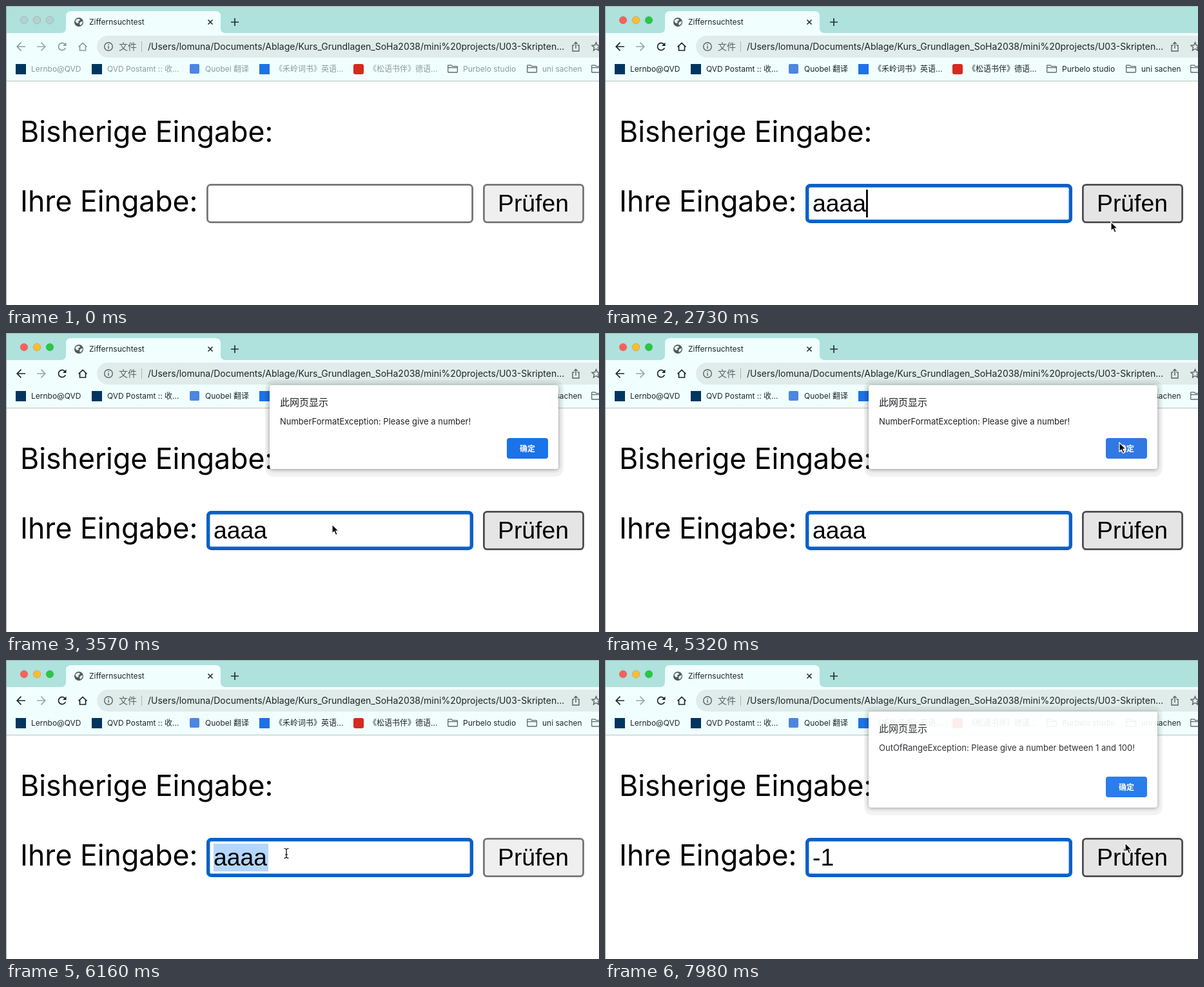
Write an HTML page that moves like this. It is 920 by 464 pixels and loops after 8 s.

```html
<!DOCTYPE html>
<html lang="de">
<head>
<meta charset="utf-8">
<title>Ziffernsuchtest</title>
<style>
  html, body { margin: 0; width: 100%; height: 100%; overflow: hidden; background: #fff; }
  svg { display: block; font: 12px Inter, "Noto Sans CJK SC", sans-serif; --ink: #8f9c9c; }
  text { white-space: pre; }
  .line { fill: none; stroke-width: 1.7; }
  .ink { fill: var(--ink); }
  .inkLine { stroke: var(--ink); }
  .label { font-size: 44.6px; }
  .field { font: 37.33px "Liberation Sans", Arial, sans-serif; }
  .panel { filter: drop-shadow(0 1px 3px #0006); }
</style>
</head>
<body>
<svg width="920" height="464" viewBox="0 0 920 464">
  <defs>
    <path id="folder" class="line" stroke="#5d6969" style="stroke-width:1.3"
      d="M1.5 .8H6L7.6 2.6H14.5Q15.4 2.6 15.4 3.5V11Q15.4 12 14.5 12H1.5Q.7 12 .7 11V1.6Q.7 .8 1.5 .8ZM.7 4.6H15.4"/>
  </defs>

  <!-- Tab strip -->
  <rect width="920" height="42" fill="#afe1dd"/>
  <path d="M0 .5H920" stroke="#93b9b6"/>
  <g id="lights"><circle cx="28" cy="22" r="5.8"/><circle cx="48" cy="22" r="5.8"/><circle cx="68" cy="22" r="5.8"/></g>
  <path fill="#f0fffe" d="M0 42H85Q93 42 93 34V16Q93 8 101 8H325Q333 8 333 16V34Q333 42 341 42H920V116H0Z"/>
  <circle cx="113" cy="25" r="7" fill="#505959"/>
  <path fill="#e4f2f1" d="M108 22Q111 19 114 20L115 22 112 24 113 26 110 27 107.500 24ZM115 25L119 23.500Q119 28 115.500 30L114 28Z"/>
  <text x="129" y="29" fill="#1d2626">Ziffernsuchtest</text>
  <path class="line" stroke="#263030" d="M313.500 21.500L320.500 28.500M320.500 21.500L313.500 28.500M349 25H361M355 19V31"/>

  <!-- Toolbar -->
  <path class="line inkLine" d="M30 63H17.500M23.500 56.700L17.200 63 23.500 69.300"/>
  <path class="line" stroke="#9ba8a8" d="M48 63H60.500M54.500 56.700L60.800 63 54.500 69.300"/>
  <path class="line inkLine" d="M91.500 59.500A5.600 5.600 0 1 0 92.300 65"/>
  <path class="ink" d="M93.500 56.500V62H88Z"/>
  <path class="line inkLine" d="M112.500 63.500L119 57.300 125.500 63.500M114.500 62V69H123.500V62"/>
  <rect x="141" y="46" width="820" height="34" rx="17" fill="#dfecea"/>
  <g class="line" stroke="#596464" style="stroke-width:1.4">
    <circle cx="159" cy="63" r="6.300"/>
    <path d="M159 62V66.500M159 59.300V60.700"/>
    <path d="M881.500 61H879V70H889V61H886.500M884 66V56.500M881.200 59L884 56.300 886.800 59"/>
    <path d="M915.500 56.500L917.300 60.800 922 61.200 918.500 64.300 919.500 69 915.500 66.500 911.500 69 912.500 64.300 909 61.200 913.700 60.800Z"/>
  </g>
  <path d="M210.500 55V71" stroke="#a9b6b5"/>
  <g font-size="14">
    <text x="175" y="68" fill="#596464">文件</text>
    <text x="220" y="68" fill="#1d2626">/Users/lomuna/Documents/Ablage/Kurs_Grundlagen_SoHa2038/mini%20projects/U03-Skripten...</text>
  </g>

  <!-- Bookmarks -->
  <g fill="#003560"><rect x="15" y="90" width="16" height="16"/><rect x="133" y="90" width="16" height="16"/></g>
  <rect x="285" y="90" width="15" height="15" rx="2" fill="#4d86e0"/>
  <rect x="393" y="90" width="16" height="16" fill="#1d72e6"/>
  <rect x="539" y="90" width="16" height="16" rx="3" fill="#d62a1e"/>
  <use href="#folder" x="685" y="91"/><use href="#folder" x="808" y="91"/><use href="#folder" x="908" y="91"/>
  <g class="ink">
    <text x="39" y="102">Lernbo@QVD</text>
    <text x="157" y="102">QVD Postamt :: 收...</text>
    <text x="309" y="102">Quobel 翻译</text>
    <text x="417" y="102">《禾岭词书》英语...</text>
    <text x="563" y="102">《松语书伴》德语...</text>
    <text x="709" y="102">Purbelo studio</text>
    <text x="832" y="102">uni sachen</text>
  </g>
  <path d="M0 116.500H920" stroke="#b9c0c0"/>
  <path d="M.5 0V464" stroke="#9ba3a3"/>

  <!-- Page -->
  <text class="label" x="22" y="210.500">Bisherige Eingabe:</text>
  <text class="label" x="22" y="318.500">Ihre Eingabe:</text>
  <rect id="box" fill="#fff"/>
  <rect id="selection" x="322" y="285" width="85" height="43" fill="#b3d7fe"/>
  <text id="value" class="field" x="322" y="318.500"></text>
  <rect id="caret" y="285" width="2.800" height="43"/>
  <rect id="check" x="741.400" y="277.400" width="154.200" height="58.200" rx="5" stroke-width="2.800"/>
  <text class="field" x="763" y="318.500">Prüfen</text>

  <!-- Alert -->
  <g id="alert">
    <rect id="halo" x="402" y="73" width="463" rx="13" fill="#000" opacity=".05"/>
    <rect id="panel" class="panel" x="409" y="81" width="448" rx="4" fill="#fff"/>
    <text x="425" y="113" font-size="15" fill="#202124">此网页显示</text>
    <text id="message" x="425" y="142" font-size="13" fill="#202124"></text>
    <g id="ok">
      <rect id="okFace" x="777" y="163" width="64" height="32" rx="4"/>
      <text x="809" y="183.500" text-anchor="middle" font-weight="700" fill="#fff">确定</text>
    </g>
  </g>

  <!-- Pointer -->
  <g id="pointer">
    <path id="arrow" stroke="#fff" stroke-width="1.200" d="M0 0V14L3.200 11.200 5.600 16.500 8.200 15.400 5.800 10.200H10Z"/>
    <path id="beam" class="line" stroke="#000" style="stroke-width:1.2" d="M-3.500 -7.500Q0 -7.500 0 -5V5Q0 7.500 -3.500 7.500M3.500 -7.500Q0 -7.500 0 -5M0 5Q0 7.500 3.500 7.500M-2 2H2"/>
  </g>
</svg>
<script>
const LOOP = 8000, TICK = 70, BLINK = 560;
const svg = document.querySelector("svg");
const el = Object.fromEntries([...svg.querySelectorAll("[id]")].map(e => [e.id, e]));

// time, x, y
const path = [
  [0, 526, 475], [630, 515, 308], [2390, 515, 308], [2730, 785, 335], [2960, 785, 335],
  [3570, 506, 297], [4210, 506, 297], [4550, 791, 150], [5050, 791, 150], [5250, 798, 170],
  [5420, 798, 170], [5880, 435, 300], [7150, 435, 300], [7430, 600, 355], [7700, 807, 284]
];
// time, text in the field; each entry also restarts the caret blink
const edits = [
  [0, ""], [1330, ""], [1960, "a"], [2100, "aa"], [2310, "aaa"], [2450, "aaaa"],
  [6020, "aaaa"], [6860, "-"], [7000, "-1"]
];
const advance = { a: 20.76, "-": 12.43, 1: 20.76 };

const clamp = v => Math.max(0, Math.min(1, v));
const between = (t, a, b) => t >= a && t < b;
const inside = ([x, y], left, top, right, bottom) => between(x, left, right) && between(y, top, bottom);
const show = (e, on) => e.setAttribute("visibility", on ? "visible" : "hidden");
const set = (e, attrs) => { for (const k in attrs) e.setAttribute(k, attrs[k]); };

function pointerAt(t) {
  const next = path.findIndex(p => p[0] > t);
  if (next < 0) return path.at(-1).slice(1);
  const [t0, x0, y0] = path[next - 1], [t1, x1, y1] = path[next];
  const u = (t - t0) / (t1 - t0), k = u * u * (3 - 2 * u);
  return [x0 + (x1 - x0) * k, y0 + (y1 - y0) * k];
}

function drawWindow(t) {
  const colours = t < 630 ? ["#b5d0cd"] : ["#fe5f57", "#febc2e", "#28c840"];
  [...el.lights.children].forEach((c, i) => set(c, {
    fill: colours[i % colours.length], stroke: t < 630 ? "#9fbdb9" : "#0002"
  }));
  const active = t < 840 ? 0 : t < 910 ? 50 : 100;
  svg.style.setProperty("--ink", `color-mix(in srgb, #1d2626 ${active}%, #8f9c9c)`);
}

function drawForm(t, pos, modal) {
  const focused = between(t, 1330, 5390) || t >= 6020;
  const selected = between(t, 6160, 6860);
  const [since, text] = edits.findLast(e => e[0] <= t);
  const w = focused ? 5.4 : 2.8;
  set(el.box, {
    x: 311 + w / 2, y: 276 + w / 2, width: 414 - w, height: 61 - w, rx: 6 - w / 4,
    stroke: focused ? "#0a60c8" : "#767676", "stroke-width": w
  });
  show(el.selection, selected);
  el.value.textContent = text;
  el.caret.setAttribute("x", 322 + [...text].reduce((sum, c) => sum + advance[c], 0));
  show(el.caret, focused && !modal && !selected && (t - since) % (2 * BLINK) < BLINK);
  const hover = modal || inside(pos, 740, 276, 897, 337);
  set(el.check, { fill: hover ? "#e5e5e5" : "#efefef", stroke: hover ? "#4d4d4d" : "#767676" });
}

function drawAlert(t, pos) {
  const range = t > 7000;
  const shown = range ? clamp((t - 7860) / 130) : clamp((t - 3030) / 130) * clamp((5530 - t) / 140);
  const extra = range ? 19 : 0;
  set(el.alert, { opacity: shown, transform: `translate(0 ${-12 * (1 - shown)})` });
  set(el.panel, { height: 130 + extra });
  set(el.halo, { height: 150 + extra });
  set(el.ok, { transform: `translate(0 ${extra})` });
  set(el.okFace, { fill: inside(pos, 777, 163, 841, 195) ? "#3079e3" : "#1a73e8" });
  el.message.textContent = range
    ? "OutOfRangeException: Please give a number between 1 and 100!"
    : "NumberFormatException: Please give a number!";
}

function drawPointer(t, [x, y], modal) {
  const typing = between(t, 1960, 2450) || between(t, 6860, 7210);
  const beam = !modal && inside([x, y], 311, 276, 725, 337);
  el.pointer.setAttribute("transform", `translate(${x} ${y})`);
  show(el.arrow, !typing && !beam);
  show(el.beam, !typing && beam);
}

function frame(now) {
  const t = Math.floor((now % LOOP) / TICK) * TICK;
  const pos = pointerAt(t);
  const modal = between(t, 3010, 5390) || t >= 7860;
  drawWindow(t);
  drawForm(t, pos, modal);
  drawAlert(t, pos);
  drawPointer(t, pos, modal);
  requestAnimationFrame(frame);
}
frame(0);
</script>
</body>
</html>
```
